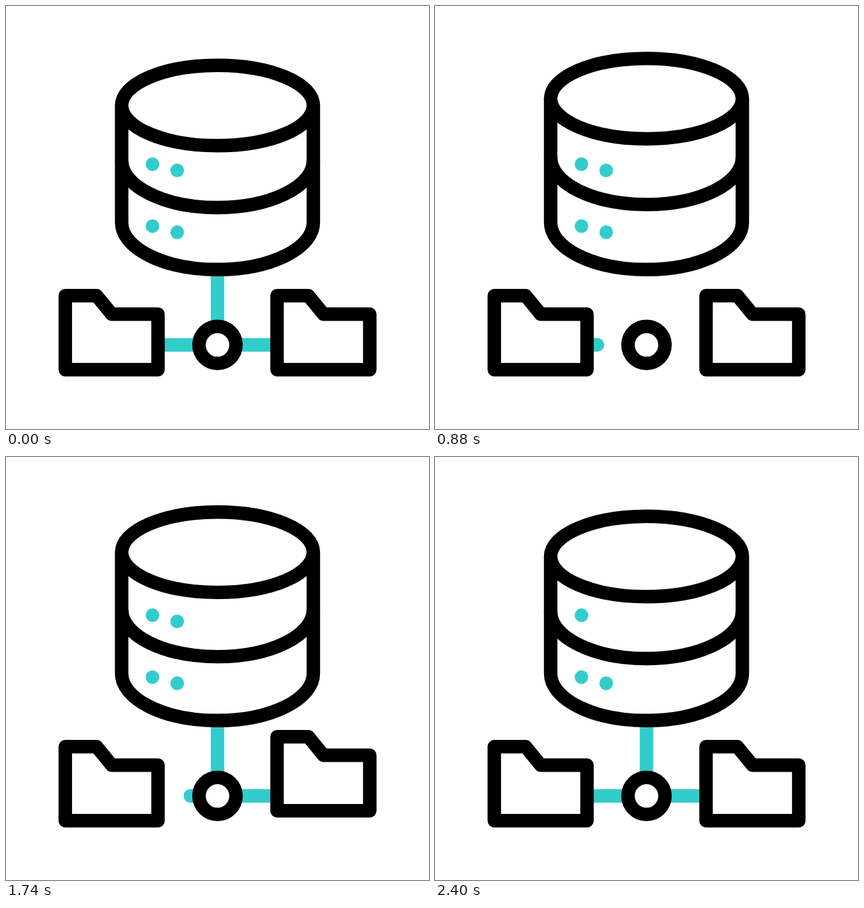
An HTML page that plays this animation: 640 by 640 pixels, repeating every 2.42 s.

```html
<!DOCTYPE html>
<html lang="en">
<head>
<meta charset="utf-8">
<title>Database network</title>
<style>
  html, body { margin: 0; height: 100%; overflow: hidden; background: #fff; }
  svg { display: block; width: 100vw; height: 100vh; }
  .ink { fill: #fff; stroke: #000; stroke-width: 20.4; stroke-linecap: round; stroke-linejoin: round; }
  .wire { fill: none; stroke: #3cc; stroke-width: 20.4; stroke-linecap: round; }
  .dots { fill: #3cc; }
</style>
</head>
<body>
<svg viewBox="0 0 640 640">
  <path class="wire" id="down"/>
  <path class="wire" id="left"/>
  <path class="wire" id="right"/>
  <g class="ink">
    <path id="body"/>
    <path id="middle" fill="none"/>
    <ellipse id="lid" cx="320" rx="145" ry="60.8"/>
    <circle id="hub" cx="320" cy="512.8"/>
    <path id="folderL" d="M89.7 438.2H137L160 466.2H230V550.3H89.7Z"/>
    <path id="folderR" d="M410.1 438.2H457.4L480.4 466.2H550.4V550.3H410.1Z"/>
  </g>
  <g class="dots">
    <circle cx="221.6" cy="239.4" r="10.3"/>
    <circle id="blinker" cx="259" cy="248.8" r="10.3"/>
    <circle cx="221.6" cy="333" r="10.3"/>
    <circle cx="259" cy="342.4" r="10.3"/>
  </g>
</svg>
<script>
const LOOP = 2420;
const el = id => document.getElementById(id);
const progress = (t, from, to) => Math.min(1, Math.max(0, (t - from) / (to - from)));
const ease = u => (1 - Math.cos(Math.PI * u)) / 2;
const pulse = (t, start, peak, end) =>
  ease(progress(t, start, peak)) - ease(progress(t, peak, end));

// A wire drains away from its start, then grows back from the same end.
function drawWire(id, t, [x1, y1, x2, y2], [drain, drained, grow, grown]) {
  const point = u => `${x1 + (x2 - x1) * u} ${y1 + (y2 - y1) * u}`;
  const growing = t >= grow;
  const from = growing ? 0 : progress(t, drain, drained);
  const to = growing ? progress(t, grow, grown) : 1;
  el(id).setAttribute('d', from < to ? `M${point(from)}L${point(to)}` : '');
}

function render(t) {
  const lift = 11.6 * (ease(progress(t, 0, 1120)) - ease(progress(t, 1200, 2360)));
  const lidY = 150.5 - lift;
  const midY = 234 - lift * 0.45;
  el('lid').setAttribute('cy', lidY);
  el('body').setAttribute('d', `M175 ${lidY}V327.8A145 71 0 0 0 465 327.8V${lidY}`);
  el('middle').setAttribute('d', `M175 ${midY}A145 71 0 0 0 465 ${midY}`);

  drawWire('down', t, [320, 398, 320, 485], [0, 400, 990, 1495]);
  drawWire('right', t, [348, 512.8, 410, 512.8], [368, 872, 1350, 1720]);
  drawWire('left', t, [292, 512.8, 230, 512.8], [506, 1010, 1650, 2080]);

  el('hub').setAttribute('r', 28 + 6.5 * pulse(t, 1280, 1420, 1700));
  const hop = (id, ...times) =>
    el(id).setAttribute('transform', `translate(0 ${-15 * pulse(t, ...times)})`);
  hop('folderR', 1580, 1740, 2080);
  hop('folderL', 1910, 2065, 2400);

  el('blinker').style.visibility = t >= 2340 ? 'hidden' : 'visible';
}

function tick() {
  render(performance.now() % LOOP);
  requestAnimationFrame(tick);
}
tick();
</script>
</body>
</html>
```
